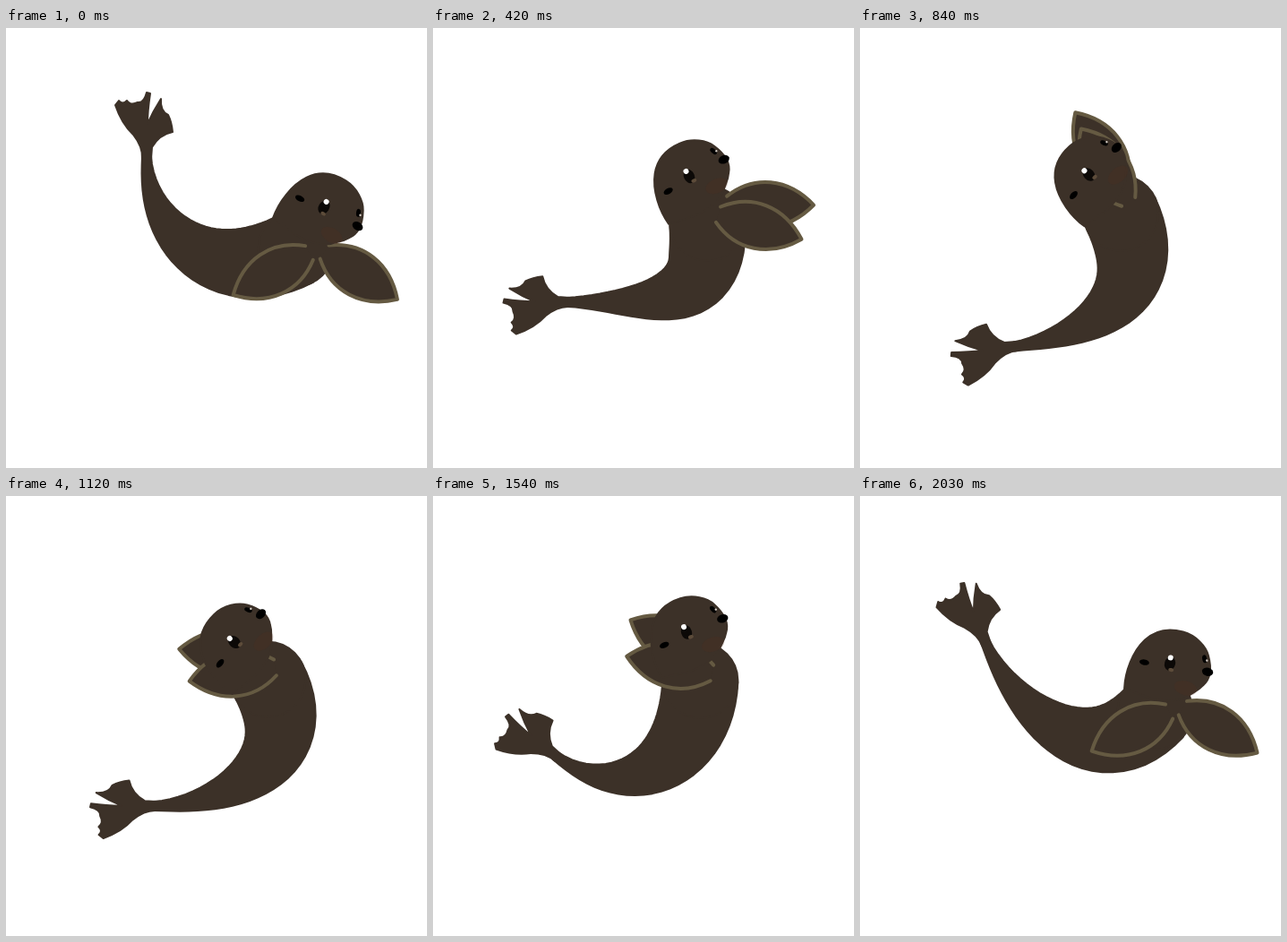
Write an HTML page that moves like this. It is 470 px wide and 491 px high and loops after 2100 ms.

```html
<!DOCTYPE html>
<html lang="en">
<head>
<meta charset="utf-8">
<title>Swimming seal</title>
<style>
  html, body { margin: 0; width: 100%; height: 100%; overflow: hidden; background: #fff; }
  svg { display: block; }
  .skin { fill: #3c3128; stroke: #3c3128; stroke-width: 2; stroke-linejoin: round; }
  .fin { fill: #3c3128; stroke: #655a42; stroke-width: 4; stroke-linecap: round; stroke-linejoin: round; }
</style>
</head>
<body>
<svg width="470" height="491" viewBox="0 0 470 491">
  <defs>
    <path id="leaf" d="M0,-9 C30,-33 68,-30 97,0 C68,30 30,33 0,9"/>
  </defs>
  <path id="tail" class="skin" d="M-5,3 Q-4,-10 -15,-24 Q-28,-36 -35,-57 L-31,-62 Q-27,-57 -22,-62 Q-18,-56 -10,-60
    Q-3,-59 0,-71 L4,-70 Q1,-50 1,-36 Q7,-50 16,-64 Q15,-50 24,-46 Q28,-38 29,-27 Q14,-24 6,-10 L5,3Z"/>
  <path id="body" class="skin"/>
  <circle id="chest" class="skin" r="42"/>
  <use id="far" class="fin" href="#leaf" x="8"/>
  <use id="near" class="fin" href="#leaf"/>
  <g id="head">
    <path class="skin" d="M-42,40 C-46,22 -44,-2 -34,-18 C-24,-34 -8,-38 5,-38 C20,-38 34,-29 39,-20
      C46,-8 49,4 42,14 C38,22 33,24 28,31 Q15,42 -10,43Z"/>
    <ellipse cx="24" cy="22" rx="13" ry="8" fill="#5a2c1c" opacity=".18"/>
    <ellipse cx="-28" cy="6" rx="5.5" ry="3.2" transform="rotate(-5 -28 6)"/>
    <ellipse rx="6" ry="8" fill="#0c0907"/>
    <ellipse cx="3" cy="6.5" rx="3" ry="2" fill="#5d4c3a"/>
    <circle cx="-1" cy="-6.5" r="3" fill="#fff"/>
    <ellipse cx="36" cy="-15" rx="2.5" ry="4.5" transform="rotate(-25 36 -15)"/>
    <circle cx="39" cy="-14" r="1.2" fill="#d8d0c8"/>
    <ellipse cx="43" cy="-2" rx="6.3" ry="4.6"/>
  </g>
</svg>
<script>
const LOOP = 2100, STEP = 70, SAMPLES = 28;

// time, tail x y angle, head x y angle, near and far flipper angles (degrees)
const poses = [
  [0,    157, 143, 0,    355, 200, 32,   151,  33],
  [280,  120, 247, -75,  316, 167, -7.5, 90,   72],
  [560,  179, 365, -106, 256, 164, -39,  -57,  -71],
  [1120, 165, 346, -91,  255, 163, -44,  -189, -175],
  [1540, 137, 290, -52,  283, 152, -18,  -169, -153],
  [1750, 137, 206, -15,  320, 160, 0,    -179, 3],
  [2030, 140, 163, -23,  346, 187, 15,   -207, 31]
];
// The near flipper makes one full turn per loop
poses.push(poses[0].map((v, k) => k === 0 ? LOOP : k === 7 ? v - 360 : v));

const el = id => document.getElementById(id);

// The point (dx, dy) of a part that stands at x, y and is turned by an angle
function offset(x, y, angle, dx, dy = 0) {
  const r = angle * Math.PI / 180, c = Math.cos(r), s = Math.sin(r);
  return [x + dx * c - dy * s, y + dx * s + dy * c];
}

function place(id, x, y, angle) {
  el(id).setAttribute("transform", `translate(${x} ${y}) rotate(${angle})`);
}

// Bezier spine, thin at the tail and widening towards the chest
function bodyPath(a, b, c, d) {
  const left = [], right = [];
  for (let k = 0; k <= SAMPLES; k++) {
    const t = k / SAMPLES, u = 1 - t;
    const [x, y] = [0, 1].map(j => u**3 * a[j] + 3*u*u*t * b[j] + 3*u*t*t * c[j] + t**3 * d[j]);
    const [vx, vy] = [0, 1].map(j => u*u * (b[j] - a[j]) + 2*u*t * (c[j] - b[j]) + t*t * (d[j] - c[j]));
    const w = (5 + 37 * Math.sin(t * Math.PI / 2) ** 1.4) / Math.hypot(vx, vy);
    left.push([x + vy * w, y - vx * w]);
    right.unshift([x - vy * w, y + vx * w]);
  }
  return `M${left.concat(right).join(" ")}Z`;
}

function draw(time) {
  const i = poses.findLastIndex(pose => pose[0] <= time);
  const from = poses[i], to = poses[i + 1];
  const p = (time - from[0]) / (to[0] - from[0]);
  const [, tx, ty, ta, hx, hy, ha, near, far] = from.map((v, k) => v + (to[k] - v) * p);

  const chest = offset(hx, hy, ha, -2, 56);
  const tailPull = offset(tx, ty, ta + 90, 88);
  const chestPull = offset(...chest, 1.2 * ha - 66, -98);
  el("body").setAttribute("d", bodyPath([tx, ty], tailPull, chestPull, chest));

  place("tail", tx, ty, ta);
  place("chest", ...chest, 0);
  place("head", hx, hy, ha);
  place("near", ...offset(hx, hy, ha, 13, 52), near);
  place("far", ...offset(hx, hy, ha, 19, 42), far);
}

const start = performance.now();
function tick() {
  const t = (performance.now() - start) % LOOP;
  draw(Math.floor(t / STEP) * STEP);
  requestAnimationFrame(tick);
}
tick();
</script>
</body>
</html>
```
